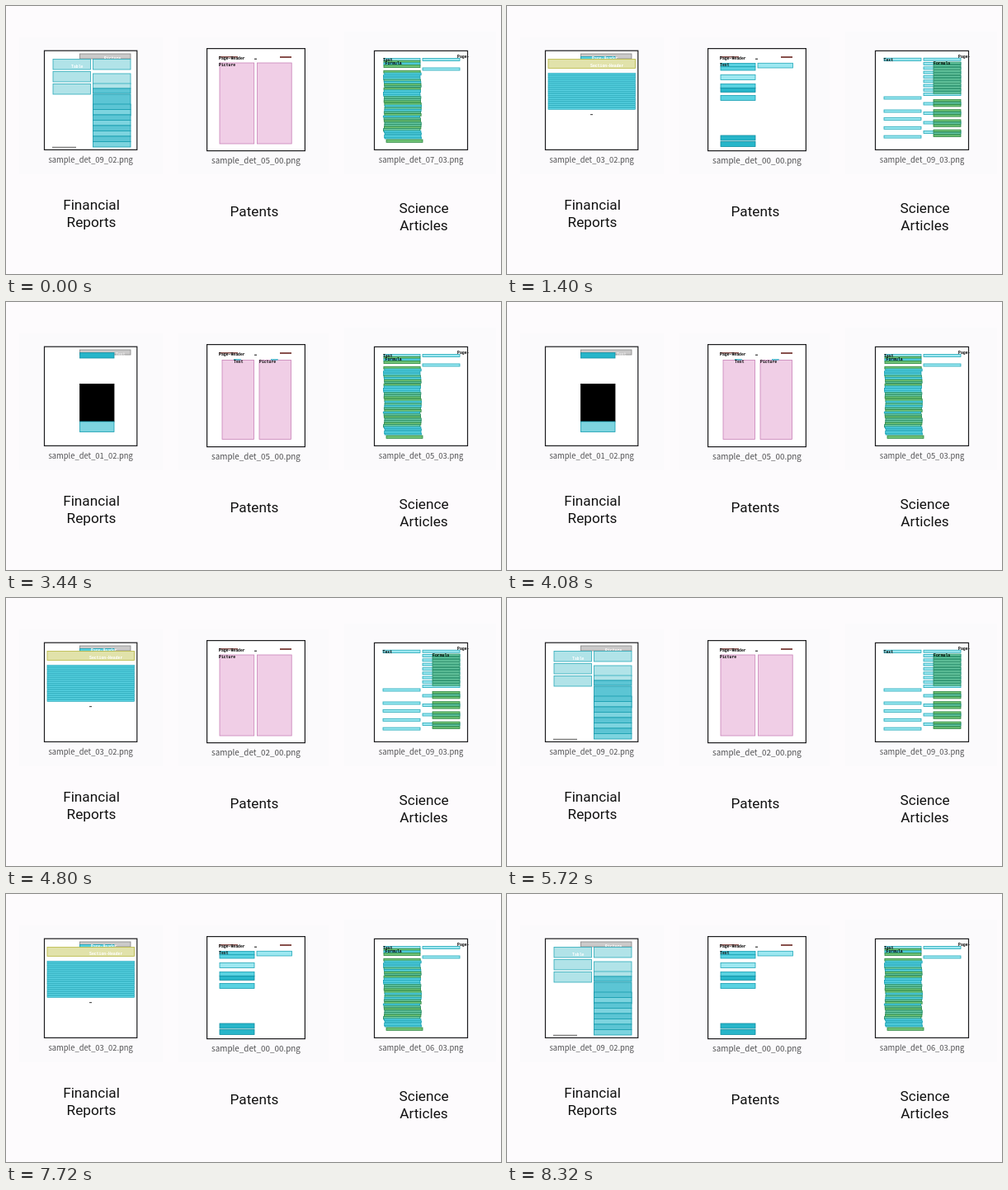
Write an HTML page that moves like this. It is 600 px wide and 325 px high and loops after 8.36 s.

```html
<!DOCTYPE html>
<html lang="en">
<head>
<meta charset="utf-8">
<title>Page layout samples</title>
<style>
html, body { margin: 0; width: 100%; height: 100%; overflow: hidden; background: #fdfbfd; }
svg { display: block; width: 600px; height: 325px; }
text { white-space: pre; }
.title { font: 17.2px Roboto, sans-serif; fill: #111; text-anchor: middle; }
.file { font-family: "Noto Sans CJK JP", "Noto Sans CJK SC", "Noto Sans CJK", Lato, sans-serif; fill: #505052; text-anchor: middle; }
.tag { font: bold 4.8px "Liberation Mono", monospace; }
</style>
</head>
<body>
<svg id="stage" viewBox="0 0 600 325"></svg>
<script>
const LOOP = 8360, STEP = 40;
const stage = document.getElementById('stage');

function add(parent, name, attrs, text) {
  const el = document.createElementNS('http://www.w3.org/2000/svg', name);
  for (const key in attrs) el.setAttribute(key, attrs[key]);
  if (text) el.textContent = text;
  return parent.appendChild(el);
}

// Fill and outline of each kind of region
const KIND = {
  pale: ['#b1e3e8', '#2caab9'],
  aqua: ['#7dd4df', '#169db0'],
  teal: ['#5cc5d4', '#1698aa'],
  deep: ['#27b5c9', '#128fa2'],
  cyan: ['#9de8f1', '#22a9b9'],
  sky: ['#5ad2e1', '#159fb2'],
  grey: ['#cbcaca', '#858585'],
  olive: ['#e1e2aa', '#b9b944'],
  pink: ['#f0cee6', '#c983b8'],
  green: ['#72c477', '#29863f'],
  mint: ['#66c5a0', '#238b62'],
  forest: ['#1e881f', '#176b18'],
  black: ['#000', '#000'],
  brown: ['#87504c', 'none'],
  ink: ['#555', 'none']
};

function box(g, kind, x, y, width, height, line = 0.8) {
  const [fill, stroke] = KIND[kind];
  add(g, 'rect', { x, y, width, height, fill, stroke, 'stroke-width': line });
}

// Evenly spaced boxes of one column; several kinds take turns
function rows(g, kinds, x, width, top, end, pitch, height = pitch, line = 0.8) {
  const turn = kinds.split(' ');
  const count = Math.round((end - top) / pitch);
  for (let i = 0; i < count; i++) {
    box(g, turn[i % turn.length], x, top + i * pitch, width, height, line);
  }
}

function tag(g, x, y, text, fill = '#000') {
  add(g, 'text', { class: 'tag', x, y, fill }, text);
}

function random(seed) {
  return () => (seed = (seed * 16807) % 2147483647) / 2147483647;
}

const reports = {
  head(g) {
    box(g, 'grey', 89.5, 58, 61.5, 6);
  },
  blocks(g) {
    tag(g, 119, 65, 'Picture', '#fff');
    rows(g, 'pale', 57, 45.5, 64.5, 109.5, 15, 12.5);
    rows(g, 'pale', 105.5, 45.5, 64.5, 99, 17.5, 12.5);
    rows(g, 'pale teal', 105.5, 45.5, 94, 106, 6);
    rows(g, 'teal', 105.5, 45.5, 107, 133, 13);
    rows(g, 'teal aqua', 105.5, 45.5, 119, 171, 6.5);
    tag(g, 79, 74.5, 'Table', '#fff');
    box(g, 'ink', 56, 170.8, 29, 1);
  },
  lines(g) {
    box(g, 'sky', 89.5, 61.5, 41.5, 3);
    tag(g, 103, 65, 'Page-Header', '#fff');
    box(g, 'olive', 50, 64.5, 105.5, 11);
    tag(g, 101, 73.6, 'Section-Header', '#fff');
    rows(g, 'sky', 50, 105.5, 81.5, 125, 2.45, 2.2, 0.6);
    box(g, 'ink', 101, 131, 3, 1.2);
  },
  chart(g) {
    box(g, 'deep', 89.5, 61.5, 41.5, 6.5);
    tag(g, 133, 64.5, 'Text', '#eee');
    box(g, 'black', 89.5, 99.5, 41.5, 45.5);
    box(g, 'aqua', 89.5, 145, 41.5, 12.5);
  }
};

const patents = {
  head(g) {
    box(g, 'brown', 258, 61, 23, 1.4);
    box(g, 'brown', 332, 61, 14, 2);
    box(g, 'ink', 301, 63.6, 3, 1.4);
    tag(g, 258, 65.3, 'Page-Header');
  },
  wide(g) {
    for (const x of [259, 304.5]) box(g, 'pink', x, 69, 41.7, 98);
    tag(g, 258, 73.3, 'Picture');
  },
  narrow(g) {
    for (const x of [262, 307]) {
      box(g, 'pink', x, 70.5, 38.5, 96);
      box(g, 'sky', x + 14.5, 69.3, 8, 1, 0.4);
    }
    tag(g, 276, 74, 'Text');
    tag(g, 307, 74, 'Picture');
  },
  sparse(g) {
    box(g, 'cyan', 304, 69.3, 42.5, 5.7);
    box(g, 'cyan', 259, 83.5, 42, 6);
    rows(g, 'sky', 259, 42, 69.5, 78, 4.25);
    rows(g, 'sky deep', 259, 42, 94.5, 104.5, 5);
    box(g, 'sky', 259, 108.5, 42, 6);
    rows(g, 'deep', 259, 42, 157, 172, 7.5, 6);
    tag(g, 258, 73.3, 'Text');
  },
  listed(g) {
    rows(g, 'sky', 259, 42, 69.5, 93.5, 4.8);
    rows(g, 'sky', 259, 42, 98, 111, 4.3);
    rows(g, 'sky', 259, 42, 115.5, 138.5, 11.5, 5);
    rows(g, 'sky', 259, 42, 136.5, 154.5, 4.5);
    rows(g, 'cyan', 259, 42, 158, 173, 7.5, 4.7);
    rows(g, 'cyan', 304, 42.5, 69.3, 78, 4.35);
    tag(g, 258, 73.6, 'Text');
  }
};

const science = {
  head(g) {
    tag(g, 547, 63, 'Page-');
  },
  dense(g) {
    const rnd = random(71);
    rows(g, 'cyan', 505, 45, 63.5, 86.5, 11.5, 3);
    rows(g, 'cyan green sky green', 458, 44, 63.5, 74.3, 2.7, 3);
    for (let y = 78.5; y < 161; y += 2.6) {
      const kind = ['green', 'sky', 'mint'][Math.floor(rnd() * 3)];
      box(g, kind, 457.2 + rnd() * 2, y, 44.3, 1.8 + rnd() * 1.6);
    }
    box(g, 'green', 461, 162, 44, 3.3);
    tag(g, 457, 67.4, 'Text');
    tag(g, 459.5, 70.6, 'Formula');
  },
  columns(g) {
    box(g, 'cyan', 457, 63.2, 45, 3.3);
    rows(g, 'cyan', 457, 45, 110, 142, 16, 3);
    rows(g, 'cyan', 457, 45, 135.5, 168, 10.8, 3);
    rows(g, 'cyan', 505, 45, 63.2, 111, 5.3, 3);
    rows(g, 'cyan', 505, 45, 117, 165, 11.5, 3);
    rows(g, 'mint', 517, 33, 68, 107, 3.25, 2.5);
    for (let y = 113.5; y < 158; y += 12.2) rows(g, 'green mint', 517, 33, y, y + 9, 3, 2.4);
    tag(g, 456.5, 67.4, 'Text');
    tag(g, 517, 71.4, 'Formula');
  },
  banner(g) {
    box(g, 'green', 459.7, 71, 2.6, 103.2);
    box(g, 'forest', 459.5, 58.5, 100.5, 12.5);
    add(g, 'rect', { x: 450.5, y: 58.5, width: 9, height: 12.5, fill: '#777', stroke: '#222' });
    tag(g, 450.5, 63, 'Tex');
  }
};

// Each panel turns to its next view every `hold` ms; a view is a page and a file number
const panels = [
  { back: [16, 38, 174, 166], page: [46.5, 54.2, 112.3, 120.2], size: 9.4, code: '02',
    pages: reports, hold: 990, lead: 830, views: ['blocks 09', 'chart 01', 'lines 03'] },
  { back: [209, 38, 182, 166], page: [243.6, 51.6, 118.8, 124], size: 9.9, code: '00',
    pages: patents, hold: 1360, lead: 680,
    views: ['wide 05', 'sparse 00', 'listed 03', 'narrow 05', 'wide 02', 'narrow 05', 'sparse 00'] },
  { back: [410, 31, 184, 173], page: [446.5, 54.4, 113, 120], size: 9.4, code: '03',
    pages: science, hold: 1393, lead: 896,
    views: ['dense 07', 'columns 09', 'banner 01', 'dense 05', 'columns 09', 'banner 01', 'dense 06'] }
];

function frame(rect, attrs) {
  const [x, y, width, height] = rect;
  return add(stage, 'rect', { x, y, width, height, ...attrs });
}

for (const p of panels) {
  frame(p.back, { fill: '#fbfafc' });
  frame(p.page, { fill: '#fff' });
  p.groups = {};
  for (const name in p.pages) {
    p.groups[name] = add(stage, 'g', {});
    p.pages[name](p.groups[name]);
  }
  // The running head lies above every page
  stage.append(p.groups.head);
  if (p.pages === reports) p.groups.chart.before(p.groups.head), stage.insertBefore(p.groups.head, p.groups.blocks);
  frame(p.page, { fill: 'none', stroke: '#1c1c1e', 'stroke-width': 1.2 });
  const [x, y, width, height] = p.page;
  p.label = add(stage, 'text', {
    class: 'file', x: x + width / 2, y: y + height + 15.7, 'font-size': p.size
  });
}

function title(x, y, ...words) {
  words.forEach((word, i) => add(stage, 'text', { class: 'title', x, y: y + i * 20.6 }, word));
}
title(103.5, 247, 'Financial', 'Reports');
title(301, 254.8, 'Patents');
title(506.5, 251, 'Science', 'Articles');

function draw(t) {
  for (const p of panels) {
    const turn = Math.floor((t + p.lead) / p.hold) % p.views.length;
    if (turn === p.turn) continue;
    p.turn = turn;
    const [page, number] = p.views[turn].split(' ');
    for (const name in p.groups) {
      p.groups[name].style.display = name === page || name === 'head' ? '' : 'none';
    }
    p.label.textContent = `sample_det_${number}_${p.code}.png`;
  }
}

const start = performance.now();
function tick() {
  const t = (performance.now() - start) % LOOP;
  draw(Math.floor(t / STEP) * STEP);
  requestAnimationFrame(tick);
}
draw(0);
requestAnimationFrame(tick);
</script>
</body>
</html>
```
